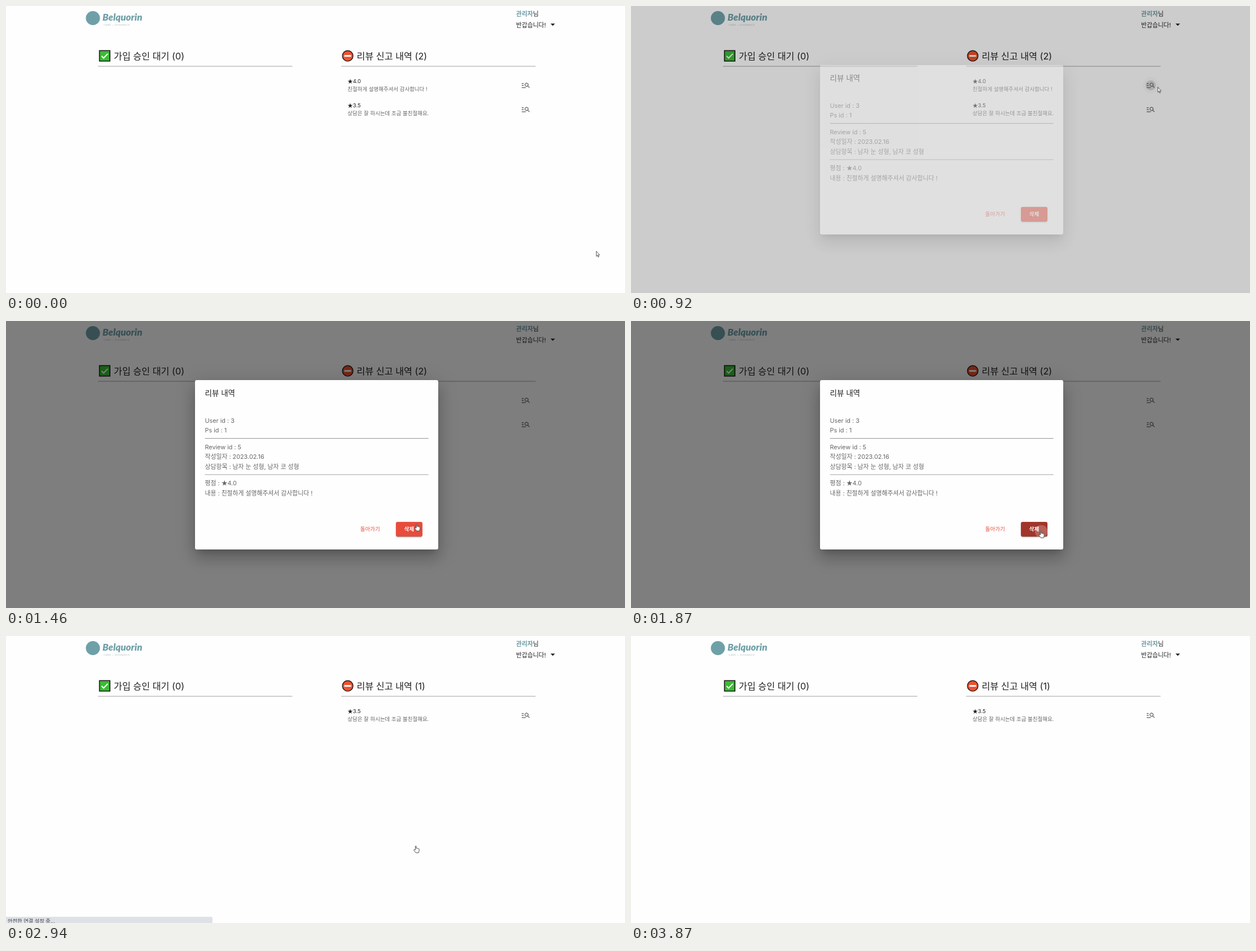
Recreate the animation shown at these times as an HTML page. Size 1097x510 px, loop 4530 ms.

```html
<!DOCTYPE html>
<html lang="ko">
<head>
<meta charset="utf-8">
<title>관리자 페이지</title>
<style>
  html, body { margin: 0; width: 100%; height: 100%; overflow: hidden; background: #fefefe; }
  body { position: relative; font-family: Inter, "Noto Sans CJK KR", "Noto Sans CJK", sans-serif; }
  svg, .backdrop, .dialog { position: absolute; left: 0; top: 0; width: 1097px; height: 510px; }

  /* Every track shares one loop; values hold until the next keyframe. */
  .anim { animation: 4.53s step-end infinite; }

  text { fill: #212121; }
  .heading { font-size: 16.2px; }
  .user, .body { font-size: 10.83px; }
  .user .role { fill: #6d9ba2; font-weight: 600; }
  .small { font-size: 9.48px; }
  .muted { fill: #666; }
  .star { font-family: "Noto Sans CJK KR", "Noto Sans CJK", sans-serif; }
  .rule { stroke: #b3b3b5; stroke-width: 1.2; }
  .icon { fill: #757575; }
  .brand { font: italic 900 17px Lato, sans-serif; fill: #6fa0a8; }
  .tagline { font: 4.6px Lato, sans-serif; fill: #b5bfc2; letter-spacing: .4px; }

  .before { animation-name: before; }
  .after { animation-name: after; }
  .shift { animation-name: shift; }
  @keyframes before { 0% { opacity: 1 } 64.9% { opacity: 0 } 100% { opacity: 0 } }
  @keyframes after { 0% { opacity: 0 } 64.9% { opacity: 1 } 100% { opacity: 1 } }
  @keyframes shift { 0% { transform: none } 64.9% { transform: translateY(-43px) } 100% { transform: translateY(-43px) } }

  .hover { animation-name: hover; }
  @keyframes hover {
    0% { opacity: 0 } 14.56% { opacity: .02 } 16.11% { opacity: .038 } 17.43% { opacity: .045 }
    20.3% { opacity: .02 } 21.85%, 100% { opacity: 0 }
  }
  .press { animation-name: press; }
  @keyframes press {
    0% { opacity: 0; r: 0 } 20.3% { opacity: .13; r: 9px } 21.85% { opacity: .08; r: 14px }
    23.39% { opacity: .03; r: 14.5px } 24.94%, 100% { opacity: 0; r: 14.5px }
  }

  .backdrop { background: rgba(0, 0, 0, .5); }
  .fade { animation-name: fade; }
  @keyframes fade {
    0% { opacity: 0 } 20.3% { opacity: .39 } 21.85% { opacity: .84 } 23.39% { opacity: .99 }
    24.94% { opacity: 1 } 64.9%, 100% { opacity: 0 }
  }
  .paper {
    position: absolute; left: 335.4px; top: 105px; width: 430.8px; height: 301px;
    border-radius: 3px; background: #fefefe;
    box-shadow: 0 8px 11px -5px rgba(0, 0, 0, .2), 0 17px 27px 2px rgba(0, 0, 0, .14), 0 6px 33px 6px rgba(0, 0, 0, .12);
  }
  .title { font-size: 13.5px; }
  .dialog .rule { stroke: #a3a3a3; }
  .back { fill: #e74c3c; font-weight: 500; }
  .delete {
    position: absolute; left: 691.4px; top: 357.3px; width: 46.2px; height: 25.8px;
    border-radius: 3px; background: #e74c3c; animation-name: darken;
    box-shadow: 0 2px 1px -1px rgba(0, 0, 0, .2), 0 1px 1px rgba(0, 0, 0, .14), 0 1px 4px rgba(0, 0, 0, .12);
  }
  .delete-label { fill: #fff; font-weight: 600; }
  @keyframes darken {
    0% { background: #e74c3c } 33.77% { background: #cb4335 } 35.32% { background: #ac382d }
    36.86%, 100% { background: #a1352a }
  }
  .ripple { fill: #fff; animation-name: ripple; }
  @keyframes ripple {
    0% { opacity: 0; r: 0 }
    36.86% { opacity: .3; r: 0; animation-timing-function: steps(8) }
    48.78%, 100% { opacity: 0; r: 45px }
  }

  .status {
    position: absolute; left: 0; top: 498.5px; width: 366px; height: 16px;
    box-sizing: border-box; padding-left: 3px; border-radius: 0 3px 0 0;
    background: #dee1e6; color: #44474b; font-size: 9.25px; line-height: 15px; white-space: nowrap;
    animation-name: status;
  }
  @keyframes status {
    0% { opacity: 0 } 50.11% { opacity: .5 } 51.65% { opacity: 1 }
    69.31% { opacity: .75 } 70.64% { opacity: .5 } 72.18% { opacity: .25 } 73.73%, 100% { opacity: 0 }
  }

  .cursor { animation-name: travel; }
  .cursor path { fill: #fff; stroke: #222; stroke-width: .8; stroke-linejoin: round; }
  .arrow { animation-name: arrow; }
  .hand { animation-name: hand; }
  @keyframes travel {
    0% { transform: translate(1045.7px, 435.3px); animation-timing-function: steps(3) }
    4.41% { transform: translate(1030px, 390px); animation-timing-function: steps(3) }
    8.83% { transform: translate(965px, 235px); animation-timing-function: steps(3) }
    13.02% { transform: translate(938px, 160px) }
    14.56% { transform: translate(934px, 147px) }
    17.43% { transform: translate(933.2px, 143.7px) }
    23.39% { transform: translate(920px, 148px) }
    24.94% { transform: translate(883px, 161px) }
    26.49% { transform: translate(845px, 192px) }
    28.03% { transform: translate(800px, 238px) }
    29.35% { transform: translate(765px, 290px) }
    30.9% { transform: translate(741px, 335px) }
    32.22% { transform: translate(723.6px, 359.8px) }
    33.77% { transform: translate(722.6px, 368px) }
    35.32% { transform: translate(722.1px, 372px) }
    79.47% { transform: translate(745px, 350px) }
    81.01% { transform: translate(800px, 290px) }
    82.56% { transform: translate(880px, 205px) }
    83.88%, 100% { transform: translate(965px, 117px) }
  }
  @keyframes arrow {
    0% { opacity: 1 } 32.22% { opacity: 0 } 79.47% { opacity: 1 } 85.43%, 100% { opacity: 0 }
  }
  @keyframes hand { 0% { opacity: 0 } 32.22% { opacity: 1 } 79.47%, 100% { opacity: 0 } }
</style>
</head>
<body>

<svg viewBox="0 0 1097 510">
  <defs>
    <path id="details" class="icon" transform="translate(912.5 132) scale(.718)" fill-rule="evenodd"
      d="M2 7h5v2H2zM2 12h5v2H2zM2 17h10v2H2zM20.6 19l-3.8-3.8A5 5 0 1 1 18.2 13.8L22 17.6zM17 11a3 3 0 1 0-6 0a3 3 0 0 0 6 0z"/>
  </defs>

  <circle cx="154" cy="21.5" r="12.5" fill="#6fa0a8"/>
  <text class="brand" x="171" y="26">Belquorin</text>
  <text class="tagline" x="173" y="35">CARE + GUIDANCE</text>

  <g class="user">
    <text x="904" y="18.4"><tspan class="role">관리자</tspan>님</text>
    <text x="904" y="37.5">반갑습니다!</text>
    <path d="M965 31.3h8l-4 4z" fill="#212121"/>
  </g>

  <rect x="165.6" y="79.3" width="18.6" height="18.6" fill="#39bd32" stroke="#1c1c1c" stroke-width="1.6"/>
  <path d="M169.4 88.9l3.6 3.6 7.4-7.6" fill="none" stroke="#fff" stroke-width="2"/>
  <text class="heading" x="191" y="94.5">가입 승인 대기 (0)</text>
  <path class="rule" d="M163 107.2H507.5"/>

  <circle cx="605.6" cy="88.7" r="9.4" fill="#f0502c" stroke="#1c1c1c" stroke-width="1.4"/>
  <path d="M599.6 88.7h12" stroke="#fff" stroke-width="3"/>
  <text class="heading anim before" x="621.5" y="94.5">리뷰 신고 내역 (2)</text>
  <text class="heading anim after" x="621.5" y="94.5">리뷰 신고 내역 (1)</text>
  <path class="rule" d="M594 107.2H938.5"/>

  <g class="anim before small">
    <circle class="anim hover" cx="921.5" cy="141" r="14.5"/>
    <circle class="anim press" cx="921" cy="141"/>
    <text x="605.3" y="136.6"><tspan class="star">★</tspan>4.0</text>
    <text class="muted" x="605.3" y="151">친절하게 설명해주셔서 감사합니다 !</text>
    <use href="#details"/>
  </g>
  <g class="anim shift small">
    <text x="605.3" y="179.6"><tspan class="star">★</tspan>3.5</text>
    <text class="muted" x="605.3" y="194">상담은 잘 하시는데 조금 불친절해요.</text>
    <use href="#details" y="43"/>
  </g>
</svg>

<div class="backdrop anim fade"></div>
<div class="dialog anim fade">
  <div class="paper"></div>
  <div class="delete anim"></div>
  <svg viewBox="0 0 1097 510">
    <clipPath id="button"><rect x="691.4" y="357.3" width="46.2" height="25.8" rx="3"/></clipPath>
    <text class="title" x="352.5" y="133">리뷰 내역</text>
    <g class="body">
      <text class="muted" x="352.5" y="181">User id : 3</text>
      <text class="muted" x="352.5" y="198.2">Ps id : 1</text>
      <text class="muted" x="352.5" y="228">Review id : 5</text>
      <text class="muted" x="352.5" y="245.2">작성일자 : 2023.02.16</text>
      <text class="muted" x="352.5" y="262.5">상담항목 : 남자 눈 성형, 남자 코 성형</text>
      <text class="muted" x="352.5" y="292.3">평점 : <tspan class="star">★</tspan>4.0</text>
      <text class="muted" x="352.5" y="309.6">내용 : 친절하게 설명해주셔서 감사합니다 !</text>
    </g>
    <path class="rule" d="M352.5 208.7H748.7M352.5 273H748.7"/>
    <g class="small">
      <text class="back" x="627.8" y="373.4">돌아가기</text>
      <g clip-path="url(#button)"><circle class="ripple anim" cx="727" cy="374"/></g>
      <text class="delete-label" x="705.8" y="373.4">삭제</text>
    </g>
  </svg>
</div>

<div class="status anim">안전한 연결 설정 중...</div>

<svg viewBox="0 0 1097 510">
  <g class="cursor anim">
    <path class="arrow anim" d="M.4.4V9.4L2.3 7.6 3.7 10.8 5 10.2 3.6 7.1H6.3z"/>
    <path class="hand anim" d="M3.4 8V1.6Q4.2.1 5 1.6V5.2Q6.2 4.5 6.8 5.5 8 4.9 8.5 5.9 10 5.6 10.1 7V9.6L9 13.2H4.2L.8 8.8Q.4 7.4 1.8 7.4Z"/>
  </g>
</svg>

</body>
</html>
```
